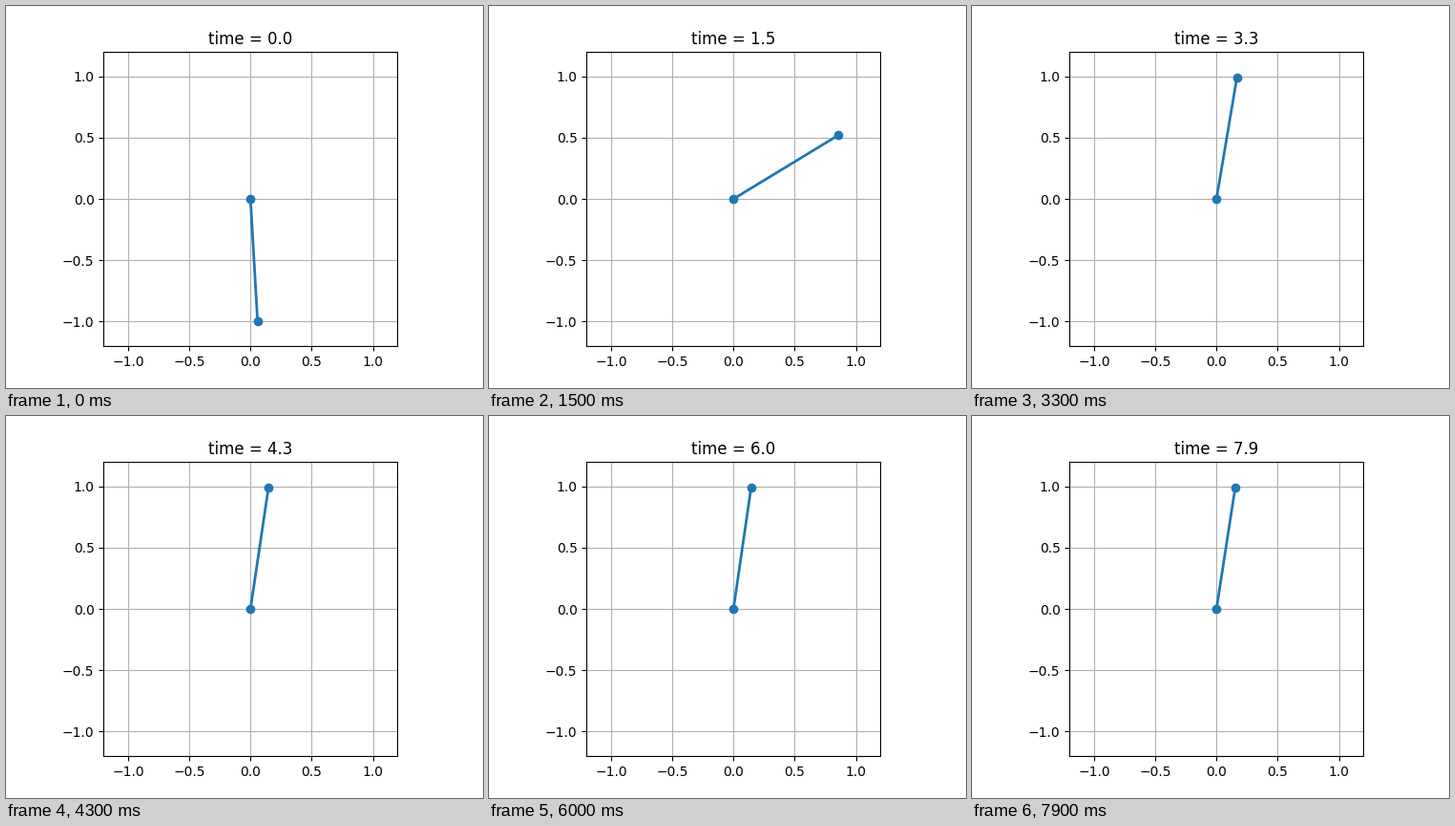
These frames come from a looping animation (500x400 px, 8000 ms). A matplotlib script:

```python
import numpy as np
import matplotlib.pyplot as plt
from matplotlib.animation import FuncAnimation

FRAMES, DT = 80, 0.1
START = 0.058        # first angle, from the downward vertical
TURN = 0.66          # time at which the backswing reverses
SWING = 4.54         # size of the swing up, in radians
OVERSHOOT = 0.03     # how far the swing aims past the top


def ease(s):
    return 0.5 - 0.5 * np.cos(np.pi * np.clip(s, 0, 1))


def angle(t):
    """Backswing, swing up, then a slow wobble just right of the top."""
    top = np.pi + OVERSHOOT
    if t < TURN:
        return START + (top - SWING - START) * ease(t / TURN)
    swing = SWING * np.exp(-((t - TURN) / 0.681) ** 1.8)
    lean = 0.149 + 0.018 * np.cos(2 * np.pi * (t - 3.3) / 3.8)
    return top - swing - (OVERSHOOT + lean) * ease((t - 2.3) / 0.8)


fig, ax = plt.subplots(figsize=(5, 4), dpi=100)
ax.set(xlim=(-1.2, 1.2), ylim=(-1.2, 1.2), aspect="equal")
ticks = np.arange(-1, 1.1, 0.5)
ax.set_xticks(ticks)
ax.set_yticks(ticks)
ax.grid()
rod, = ax.plot([], [], "o-", lw=2)
title = ax.set_title("", pad=5.4)


def update(frame):
    t = frame * DT
    a = angle(t)
    rod.set_data([0, np.sin(a)], [0, -np.cos(a)])
    title.set_text(f"time = {t:.1f}")
    return rod, title


anim = FuncAnimation(fig, update, frames=FRAMES, interval=100,
                     repeat=True, repeat_delay=0)
plt.show()
```
